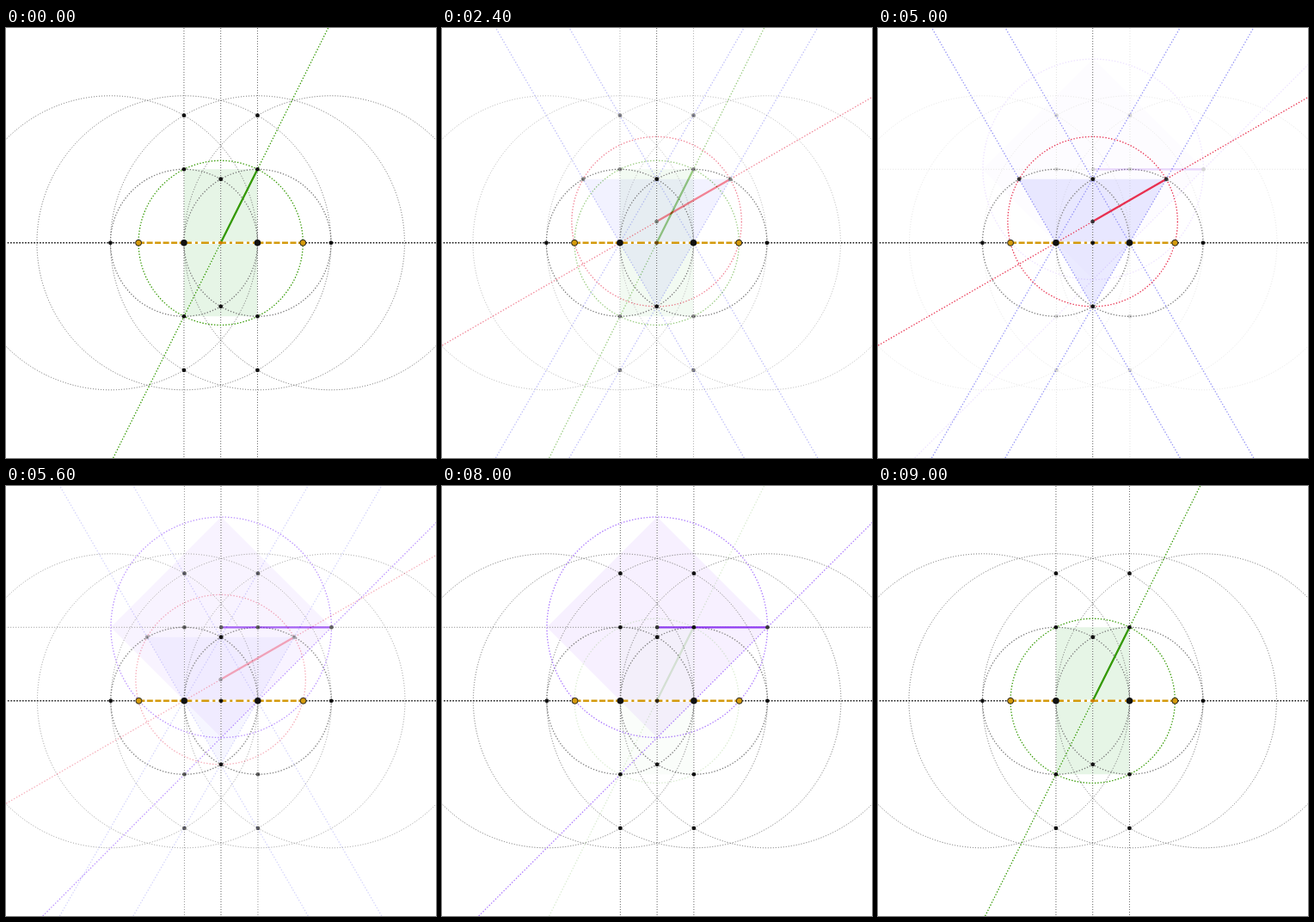
Animation, 500 px wide and 500 px high, one loop 9100 ms. Source, as an HTML page:

```html
<!DOCTYPE html>
<html lang="en">
<head>
<meta charset="utf-8">
<title>Compass constructions</title>
<style>
  html, body { margin: 0; width: 100%; height: 100%; overflow: hidden; background: #fff; }
  svg { position: absolute; left: 0; top: 0; width: 500px; height: 500px; background: #fff; }
  svg * { fill: none; }
  .guide { stroke: #666; stroke-width: 1; stroke-dasharray: 1 2; }
  .base { stroke: #777; stroke-width: 1.3; stroke-dasharray: 1.3 2; }
  .axis { stroke: #111; stroke-width: 1.6; stroke-dasharray: 1.6 1.8; }
  .accent { stroke-width: 1.3; stroke-dasharray: 1.4 2; }
  .radius { stroke-width: 2.3; stroke-linecap: round; }
  .gap { stroke: #fff; stroke-width: 2.6; }
  .gold { stroke: #d49a0c; stroke-width: 2.6; }
  .outer { stroke-dasharray: 7 2.5; }
  .inner { stroke-dasharray: 9 4 3 4; }
  .dot { fill: #111; }
  .end { fill: #d49a0c; stroke: #222; stroke-width: 1; }
  .middle { fill: #cc7a00; }
</style>
</head>
<body>
<script>
const NS = 'http://www.w3.org/2000/svg';
const R = 85.5, H = R / 2, V = R * Math.sqrt(3) / 2, CY = 249.8;
const GREEN = '#339900', RED = '#e60a2e', BLUE = '#8080f5', PURPLE = '#7a14f0', LILAC = '#9a5cff';

// Coordinates passed to the helpers are relative to the middle of the base segment.
function scene(cx, draw) {
  const svg = document.createElementNS(NS, 'svg');
  svg.setAttribute('viewBox', '0 0 500 500');
  document.body.append(svg);
  const add = (tag, cls, attrs) => {
    const el = document.createElementNS(NS, tag);
    el.setAttribute('class', cls);
    for (const key in attrs) el.setAttribute(key, attrs[key]);
    svg.append(el);
  };
  const pen = {
    line(cls, x1, y1, x2, y2, color) {
      add('line', cls, { x1: cx + x1, y1: CY + y1, x2: cx + x2, y2: CY + y2, ...(color && { stroke: color }) });
    },
    circle(cls, x, y, r, color) {
      add('circle', cls, { cx: cx + x, cy: CY + y, r, ...(color && { stroke: color }) });
    },
    area(color, points) {
      add('polygon', '', { points: points.map(([x, y]) => [cx + x, CY + y]).join(' '), style: `fill:${color}` });
    },
    dots(points) {
      for (const [x, y] of points) pen.circle('dot', x, y, 2.4);
    },
    // Full line through (x, y), running to the stage edges
    ray(x, y, slope, color) {
      const top = -CY, bottom = 500 - CY;
      pen.line('accent', x + (bottom - y) / slope, bottom, x + (top - y) / slope, top, color);
    },
    vertical(x) { pen.line('guide', x, -CY, x, 500 - CY); }
  };
  draw(pen);
  return svg;
}

function base(p) {
  for (const x of [-H, H]) p.circle('base', x, 0, R);
  p.vertical(0);
  p.line('axis', -248, 0, 251, 0);
}

function grid(p) {
  for (const x of [-3 * H, -H, H, 3 * H]) p.circle('guide', x, 0, 2 * R);
  p.vertical(-H);
  p.vertical(H);
  base(p);
}

function measure(p) {
  const end = H * Math.sqrt(5);
  p.line('gap', -end, 0, end, 0);
  p.line('gold outer', -end, 0, -H, 0);
  p.line('gold inner', -H, 0, H, 0);
  p.line('gold outer', H, 0, end, 0);
  for (const side of [-1, 1]) {
    p.circle('dot', side * H, 0, 3.8);
    p.circle('end', side * end, 0, 3.5);
  }
  p.dots([[-3 * H, 0], [3 * H, 0], [0, -V], [0, V]]);
}

function gridDots(p) {
  for (const x of [-H, H])
    p.dots([-2 * V, -R, R, 2 * V].map(y => [x, y]));
}

const scenes = [
  scene(249.7, p => {
    p.area('#e6f5e6', [[-H, -R], [H, -R], [H, R], [-H, R]]);
    grid(p);
    p.circle('accent', 0, 0, H * Math.sqrt(5), GREEN);
    p.ray(0, 0, -2, GREEN);
    measure(p);
    p.line('radius', 0, 0, H, -R, GREEN);
    gridDots(p);
    p.circle('middle', 0, 0, 2);
  }),
  scene(249.6, p => {
    const mid = -V / 3;
    p.area('#e6e6ff', [[-R, -V], [R, -V], [0, V]]);
    base(p);
    for (const x of [-H, H])
      for (const side of [-1, 1]) p.ray(x, 0, side * Math.sqrt(3), BLUE);
    p.circle('accent', 0, mid, V * 4 / 3, RED);
    p.ray(0, mid, -1 / Math.sqrt(3), RED);
    measure(p);
    p.line('radius', 0, mid, R, -V, RED);
    p.dots([[0, 0], [0, mid], [-R, -V], [R, -V]]);
  }),
  scene(250.2, p => {
    const r = 3 * H;
    p.area('#f6eeff', [[-r, -R], [0, -R - r], [r, -R], [0, r - R]]);
    grid(p);
    p.line('guide', -251, -R, 251, -R);
    p.circle('accent', 0, -R, r, LILAC);
    p.ray(H, 0, -1, LILAC);
    measure(p);
    p.line('radius', 0, -R, r, -R, PURPLE);
    gridDots(p);
    p.dots([[0, 0], [0, -R], [r, -R]]);
  })
];

const LOOP = 9100, SPAN = 3000, HOLD = 2000, STEP = 200;

// Each scene holds, then dissolves into the next in sixths.
function frame(now) {
  const t = now % LOOP;
  const current = Math.floor(t / SPAN) % 3, next = (current + 1) % 3;
  const mix = Math.max(0, Math.floor((t % SPAN - HOLD) / STEP) + 1) / 6;
  scenes.forEach((svg, i) => {
    svg.style.zIndex = i === next ? 2 : i === current ? 1 : 0;
    svg.style.opacity = i === next ? mix : i === current ? 1 : 0;
  });
  requestAnimationFrame(frame);
}
frame(0);
</script>
</body>
</html>
```
